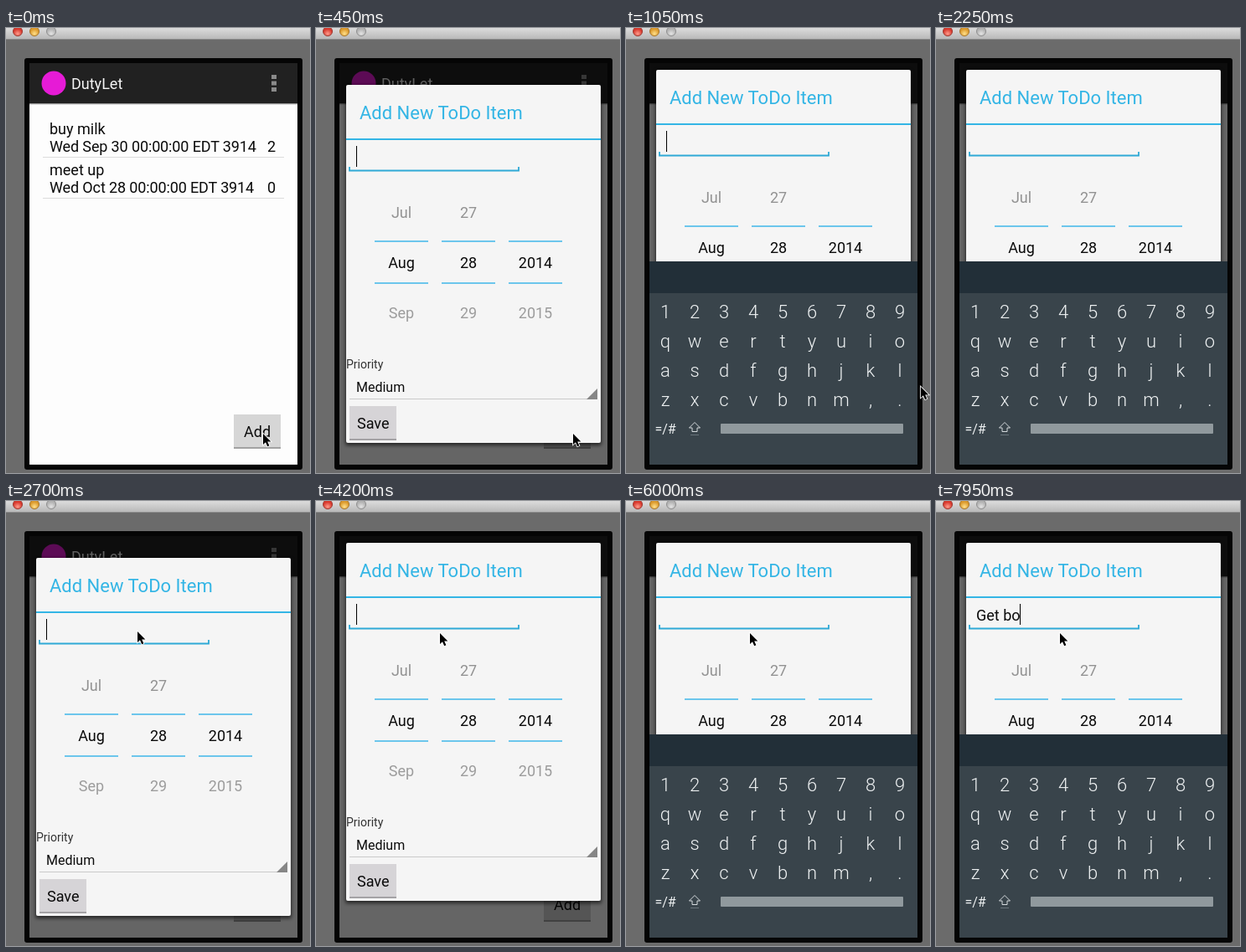
Animation, 363 px wide and 532 px high, one loop 8 s. Source, as an HTML page:

```html
<!DOCTYPE html>
<html lang="en">
<head>
<meta charset="utf-8">
<title>Add a to-do item</title>
<style>
html, body { margin: 0; width: 363px; height: 532px; overflow: hidden; background: #6b6b6b; }
svg { display: block; }
text { font-family: Roboto, "Noto Sans", sans-serif; font-size: 18px; fill: #0b0b0b; white-space: pre; }
.mid { text-anchor: middle; }
.key { font-size: 22px; font-weight: 300; fill: #eef1f2; }
</style>
</head>
<body>
<svg width="363" height="532" viewBox="0 0 363 532">
  <defs>
    <linearGradient id="bar" x2="0" y2="1"><stop stop-color="#dcdcdc"/><stop offset="1" stop-color="#b9b9b9"/></linearGradient>
    <linearGradient id="under" x2="0" y2="1"><stop stop-color="#777"/><stop offset="1" stop-color="#fdfdfd"/></linearGradient>
    <radialGradient id="red" cy=".75"><stop stop-color="#ff9c8c"/><stop offset="1" stop-color="#d8392e"/></radialGradient>
    <radialGradient id="amber" cy=".75"><stop stop-color="#ffe08a"/><stop offset="1" stop-color="#dc9a2c"/></radialGradient>
    <radialGradient id="grey" cy=".75"><stop stop-color="#e4e4e4"/><stop offset="1" stop-color="#b4b4b4"/></radialGradient>
    <filter id="soft" x="-10%" y="-10%" width="120%" height="120%"><feGaussianBlur stdDeviation="2"/></filter>
    <clipPath id="screen"><path d="M28 42h320v480h-320z"/></clipPath>
  </defs>

  <!-- window -->
  <path d="M0 0h363v532h-363z" fill="#6b6b6b"/>
  <path d="M0 0h363v13h-363z" fill="url(#bar)"/>
  <path d="M0 13h363v1h-363z" fill="#8a8a8a"/>
  <g stroke-width="1">
    <circle cx="14" cy="4" r="5.5" fill="url(#red)" stroke="#9c3a32"/>
    <circle cx="34" cy="4" r="5.5" fill="url(#amber)" stroke="#a5762c"/>
    <circle cx="54" cy="4" r="5.5" fill="url(#grey)" stroke="#8e8e8e"/>
  </g>
  <rect x="22" y="36" width="332" height="492" rx="3" fill="#050505"/>

  <g clip-path="url(#screen)">
    <!-- list screen -->
    <path d="M28 42h320v480h-320z" fill="#fdfdfd"/>
    <path d="M28 42h320v48h-320z" fill="#212121"/>
    <path d="M28 90h320v2h-320z" fill="url(#under)"/>
    <circle cx="57" cy="66" r="14.5" fill="#e61bd6"/>
    <text x="78" y="73" style="fill:#f3f3f3">DutyLet</text>
    <path d="M317 56h6v5h-6zm0 7.500h6v5h-6zm0 7.500h6v5h-6z" fill="#8a8a8a"/>
    <text x="52" y="127">buy milk</text>
    <text x="52" y="148" letter-spacing="-.13">Wed Sep 30 00:00:00 EDT 3914</text>
    <text x="312" y="148">2</text>
    <text x="52" y="176">meet up</text>
    <text x="52" y="197" letter-spacing="-.13">Wed Oct 28 00:00:00 EDT 3914</text>
    <text x="312" y="197">0</text>
    <path d="M44 154h288v1h-288zm0 49h288v1h-288z" fill="#dcdcdc"/>
    <path d="M272 462h56v41h-56z" fill="#a2a2a2"/>
    <path id="add" d="M272 462h56v39h-56z" fill="#d6d6d6"/>
    <text x="284" y="489">Add</text>
    <path id="dim" d="M28 42h320v480h-320z"/>

    <!-- dialog, drawn from its own top edge -->
    <g id="dialog">
      <rect x="35" y="1" width="306" height="430" rx="2" opacity=".6" filter="url(#soft)"/>
      <rect x="36" width="304" height="428" rx="2" fill="#f5f5f5"/>
      <text x="52" y="41" style="font-size:22px;fill:#33b5e5">Add New ToDo Item</text>
      <path d="M36 64h304v2h-304z" fill="#33b5e5"/>
      <path d="M40 98v4.500h202v-4.500" fill="none" stroke="#2fa9d6" stroke-width="1.800"/>
      <text id="typed" x="48" y="93"></text>
      <path id="caret" d="M0 73h1v25h-1z"/>
      <g id="picker"></g>
      <text x="36" y="339" style="font-size:14px;fill:#333">Priority</text>
      <text x="48" y="367" style="font-size:16px">Medium</text>
      <path d="M40 375h296v1h-296z" fill="#cacaca"/>
      <path d="M336 363v13h-13z" fill="#868686"/>
      <path d="M40 384h56v41h-56z" fill="#a4a2a5"/>
      <path d="M40 384h56v39h-56z" fill="#d6d4d7"/>
      <text x="49" y="411">Save</text>
    </g>

    <!-- keyboard -->
    <g id="board">
      <path d="M28 279h320v243h-320z" fill="#39444b"/>
      <path d="M28 279h320v38h-320z" fill="#222f38"/>
      <text class="mid" x="47" y="485" style="font-size:16px;fill:#eef1f2">=/#</text>
      <path d="M82 471.500l6.500 6.500h-3.500v4.500h-6v-4.500h-3.500z" fill="none" stroke="#d5dadd"/>
      <path d="M77 486.500h10" stroke="#68737a"/>
      <rect x="113" y="473" width="218" height="12" rx="1" fill="#90999d"/>
    </g>
  </g>

  <path id="mouse" d="M0 0v13l3-2.700 2.200 4.900 2.200-1-2.200-4.700h4.200z" stroke="#fff" stroke-width="1.600" paint-order="stroke"/>
</svg>

<script>
const LOOP = 8000;
const $ = id => document.getElementById(id);

function add(parent, tag, attrs, label = '') {
  const el = document.createElementNS('http://www.w3.org/2000/svg', tag);
  for (const k in attrs) el.setAttribute(k, attrs[k]);
  el.textContent = label;
  parent.append(el);
}

// date picker columns
[['Jul', 'Aug', 'Sep'], ['27', '28', '29'], ['', '2014', '2015']].forEach((column, i) => {
  const x = 102 + 80 * i;
  column.forEach((label, row) => add($('picker'), 'text', {
    class: 'mid', x, y: 159 + 60 * row, style: 'fill:' + ['#929292', '#0b0b0b', '#9c9c9c'][row]
  }, label));
  for (const y of [186, 236]) add($('picker'), 'rect', { x: x - 32, y, width: 64, height: 2, fill: '#6cc6ec' });
});

['123456789', 'qwertyuio', 'asdfghjkl', 'zxcvbnm,.'].forEach((row, r) =>
  [...row].forEach((label, c) => add($('board'), 'text', {
    class: 'mid key', x: 47 + 35 * c, y: 347 + 35 * r
  }, label)));

// Each track lists [start time, ...values]; values hold until the next step.
const tracks = {
  press: [[0, 0], [150, 1], [300, 0]],
  // opacity, scale
  open: [[0, 0, 1], [300, .5, .93], [450, 1, 1]],
  top: [[0, 68], [600, 66], [750, 56], [900, 50], [2550, 61], [2700, 68], [4050, 61], [4200, 50]],
  // downward shift of the keyboard
  board: [[0, 243], [900, 110], [1050, 0], [2400, 130], [2550, 243], [4500, 110], [4650, 0]],
  caret: [[0, 1], [1200, 0], [1650, 1], [2250, 0], [2550, 1], [3300, 0], [3750, 1],
    [4950, 0], [5400, 1], [6000, 0], [6450, 1]],
  // letters shown, caret x
  typed: [[0, 0, 48], [6450, 1, 60], [6600, 2, 69], [6900, 3, 76], [7200, 4, 80], [7650, 5, 90], [7950, 6, 100]],
  mouse: [[0, 307, 485], [900, 334, 457], [1050, 352, 429], [1200, 360, 408], [1350, 400, 400],
    [2400, 222, 190], [2550, 172, 162], [2700, 157, 156], [2850, 156, 157], [3000, 155, 158],
    [3150, 154, 159], [3300, 151, 159], [3450, 148, 158]]
};

function at(name, t) {
  return tracks[name].findLast(step => step[0] <= t).slice(1);
}

function draw(t) {
  const [alpha, scale] = at('open', t);
  const [top] = at('top', t);
  const [letters, caretX] = at('typed', t);
  $('add').setAttribute('fill', at('press', t)[0] ? '#8fcde6' : '#d6d6d6');
  $('dim').setAttribute('opacity', .6 * alpha);
  $('dialog').setAttribute('opacity', alpha);
  $('dialog').setAttribute('transform',
    `translate(${188 * (1 - scale)} ${top + 214 * (1 - scale)}) scale(${scale})`);
  $('typed').textContent = 'Get bo'.slice(0, letters);
  $('caret').setAttribute('transform', `translate(${caretX} 0)`);
  $('caret').setAttribute('opacity', at('caret', t)[0]);
  $('board').setAttribute('transform', `translate(0 ${at('board', t)[0]})`);
  $('mouse').setAttribute('transform', `translate(${at('mouse', t)})`);
}

function tick() {
  draw(performance.now() % LOOP);
  requestAnimationFrame(tick);
}
tick();
</script>
</body>
</html>
```
